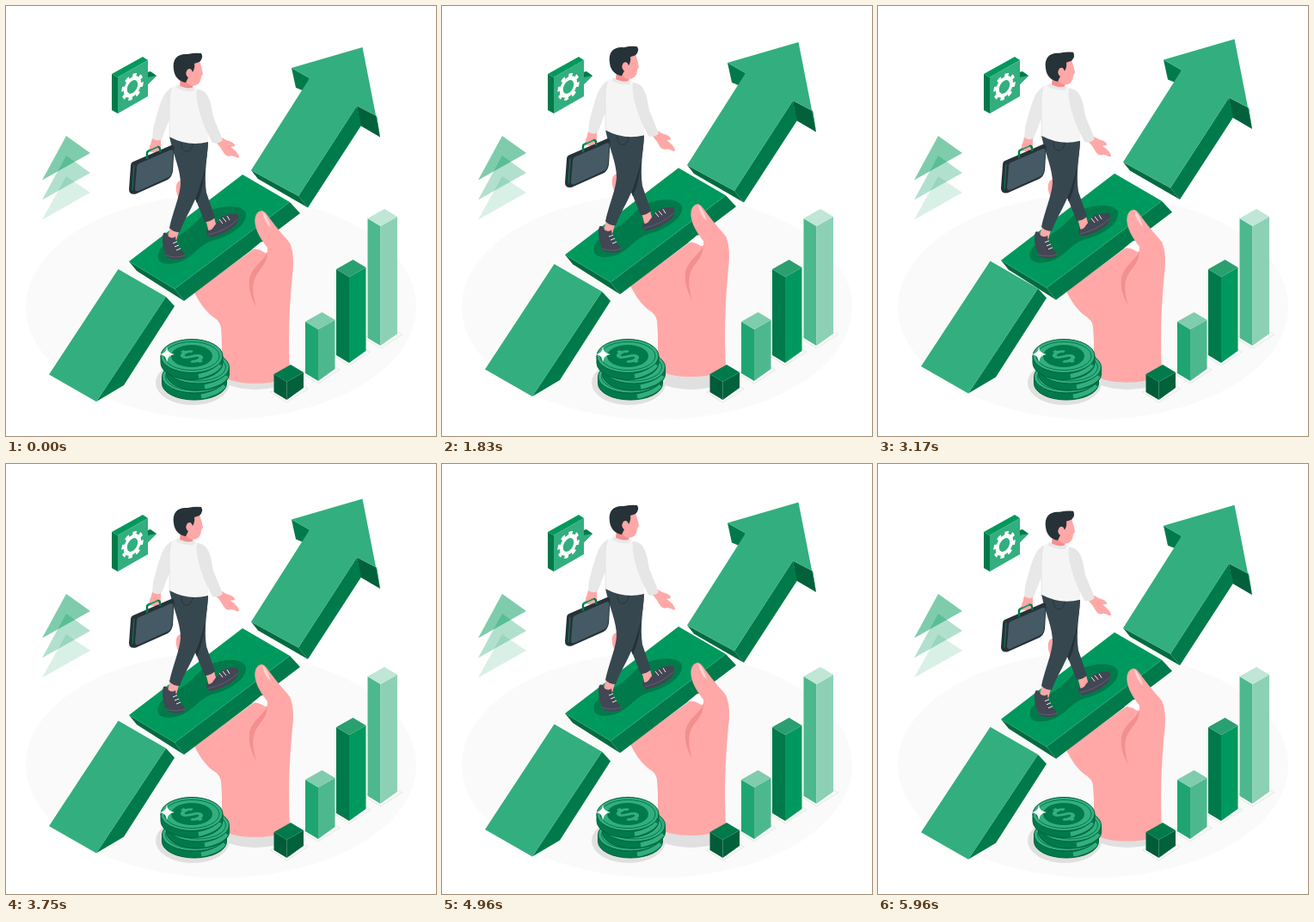
An HTML page that plays this animation: 500 px wide and 500 px high, repeating every 6 s.

```html
<!DOCTYPE html>
<html lang="en">
<head>
<meta charset="utf-8">
<title>Growth walk</title>
<style>
  html, body { margin: 0; width: 100%; height: 100%; overflow: hidden; background: #fff; }
  svg { display: block; width: 100vw; height: 100vh; }
</style>
</head>
<body>
<svg viewBox="0 0 500 500">
  <ellipse cx="250" cy="350" rx="227" ry="131" fill="#fafafa"/>
  <ellipse cx="290" cy="431" rx="41" ry="15" fill="#e0e0e0"/>
  <ellipse cx="217" cy="438" rx="43" ry="26" fill="#e0e0e0"/>

  <g id="triangles" fill="#00995d">
    <path d="M70 151 98 171 42 202.500Z" opacity=".5"/>
    <path d="M70 174 98 194 42 225.500Z" opacity=".3"/>
    <path d="M70 198 98 217 42 248.500Z" opacity=".15"/>
  </g>

  <g id="bubble">
    <path d="M164 77 168 76 175 81 164 92Z" fill="#007a4a"/>
    <path d="M164 83 175 81 164 92Z" fill="#33ae7f"/>
    <path d="M123 79 159 59 165 63 130 83Z" fill="#00995d"/>
    <path d="M123 79 130 83V125L123 121Z" fill="#007a4a"/>
    <path d="M130 83 165 63V105L130 125Z" fill="#33ae7f"/>
    <g id="gear" transform="matrix(.86 -.42 0 1 147 94)" fill="none" stroke="#fff">
      <circle r="9.500" stroke-width="4.500"/>
      <circle r="12.600" stroke-width="4.400" stroke-dasharray="5 4.896"/>
    </g>
  </g>

  <g id="arrow">
    <path d="M186 338 196 349 137 441 105 460Z" fill="#007a4a"/>
    <path d="M130.500 306 186 338 105 460 50 428.500Z" fill="#33ae7f"/>
    <path d="M332 72 353 84 347 99 337 95Z" fill="#007a4a"/>
    <path d="M408 116 431 128 435 152.500 412 139Z" fill="#00613b"/>
    <path d="M340 221 408 116 413 139 351 234.500Z" fill="#007a4a"/>
    <path d="M285 191 340 221 351 234.500 293 201Z" fill="#006b41"/>
    <path d="M414.500 48 435 152.500 431 128 408 116 340 221 285 191 353 84 332 72Z" fill="#33ae7f"/>
  </g>

  <g id="walker">
    <path d="M204 203C197 203 196 213 200 222L207 226V204Z" fill="#ffa8a7"/>
    <path d="M219 333C224 343 231 354 240 361Q249 366 250 374L251 390V427C254 443 327 443 330 426C328 390 329 355 333 312Q335 292 330 275L304 286 289 282Z" fill="#ffa8a7"/>
    <path d="M143 297 196 329 207 343 152 308Z" fill="#006b41"/>
    <path d="M196 329 330 228 342 241 207 343Z" fill="#007a4a"/>
    <path d="M143 297 275 196 330 228 196 329Z" fill="#00995d"/>
    <path d="M177 294C174 282 188 274 202 266C219 257 223 245 237 238C254 231 276 231 279 241C281 254 261 267 243 272C226 276 220 289 206 296C195 301 180 302 177 294Z" fill="#007a4a"/>

    <path d="M297 238C291 239 288 246 290 255C292 265 298 273 304 281Q305 288 299 294L316 322 333 312C335 295 334 281 328 273C318 262 309 250 303 242Q300 238 297 238Z" fill="#ffa8a7"/>
    <path d="M297 274Q304 280 304 285Q303 289 298 285 292 281 286 283Z" fill="#fff"/>
    <path d="M298 239Q304 243 308 258Q300 251 298 239Z" fill="#ffd3d2"/>
    <path d="M304 287C299 297 287 302 283 317Q281 333 291 350Q284 328 290 315C295 305 303 301 304 287Z" fill="#f28f8f"/>

    <path d="M232 248 242 246 245 257 236 263Z" fill="#ffa8a7"/>
    <path d="M233 260Q238 263 242 256 247 250 251 245 261 241 269 242 273 249 266 256 254 266 238 269 232 267 233 260Z" fill="#434653"/>
    <path d="M235 266Q255 262 270 248" fill="none" stroke="#62667a" stroke-width=".8"/>
    <path d="M248 248 252 253M252 246 256 251M257 244 260 249" stroke="#eee"/>
    <path d="M191 257 201 262 198 273 188 268Z" fill="#ffa8a7"/>
    <path d="M183 264Q187 262 189 268 194 271 197 268 198 281 206 286 209 290 207 293 197 297 187 292C184 284 180 273 183 264Z" fill="#434653"/>
    <path d="M186 290Q198 294 208 290" fill="none" stroke="#62667a" stroke-width=".8"/>
    <path d="M194 276 199 274M196 280 201 278M198 284 203 282" stroke="#eee"/>

    <path d="M212 165 235 158C234 178 230 195 233 217L243 246Q238 251 231 251L221 226Z" fill="#37474f"/>
    <path d="M231 184Q232 205 222 229L219 222Z" fill="#263238"/>
    <path d="M190 152Q210 161 235 158C234 180 230 195 226 208C220 230 209 244 202 263Q194 263 190 258C194 239 202 222 203 207C203 190 195 175 190 152Z" fill="#37474f"/>
    <path d="M204 159C203 172 216 173 217 160" fill="none" stroke="#263238" stroke-width=".9"/>

    <path d="M243 157 251 153Q255 156 262 158 267 161 266 163L261 164Q269 169 271 175 271 178 266 175L262 174Q257 176 254 172 249 163 243 157Z" fill="#ffa8a7"/>
    <path d="M193 95C182 99 178 117 171 143L170 155Q176 159 181 155L193 124Z" fill="#e8e8e8"/>
    <path d="M192 95C200 90 214 91 224 97C233 107 236 130 235 158Q212 164 190 152C191 132 188 112 192 95Z" fill="#f5f5f5"/>
    <path d="M192 95C188 112 191 132 190 152" fill="none" stroke="#e0e0e0" stroke-width=".8"/>
    <path d="M222 97C235 98 238 109 241 129L252 156Q247 161 240 159L232 143C226 128 220 110 222 97Z" fill="#e6e6e6"/>

    <path d="M203 83 219 88 216 98Q207 99 202 93Z" fill="#f28f8f"/>
    <path d="M199 91Q210 98 220 94L218 99Q207 100 198 95Z" fill="#e8e8e8"/>
    <path d="M210 71 225 64Q228 72 229 79L227 82Q227 92 217 93 208 91 208 81Z" fill="#ffa8a7"/>
    <path d="M195 74C193 61 200 55 211 56Q221 54 227 55 230 60 225 65L219 67Q220 72 217 77 215 71 211 74C208 78 210 82 212 83L209 89C202 88 196 83 195 74Z" fill="#263238"/>
    <path d="M215 74C210 72 207 80 213 83Z" fill="#ffa8a7"/>

    <path d="M170 154Q176 158 180 155L180 165 174 171 166 169Z" fill="#ffa8a7"/>
    <path d="M148 181 192 162Q196 161 195.500 167L194 192Q193 199 188 202L151 218.500Q143 220 143 213L145 186Q145 182 148 181Z" fill="#263238"/>
    <path d="M155 183 191 167.500Q195 166 194.500 171L193 191Q193 198 187 200L154 215Q150 216 150 212L152 188Q152 184 155 183Z" fill="#455a64"/>
    <path d="M149 185 147 214" stroke="#00995d" stroke-width=".8"/>
    <path d="M164 178V171Q164 169 167 168L176 164Q180 163 179 170" fill="none" stroke="#007a4a" stroke-width="2.400"/>
    <path d="M167 162 174 160 177 166 169 170Z" fill="#ffa8a7"/>
    <path d="M165 169 176 164" stroke="#00995d" stroke-width="1.600"/>
  </g>

  <g id="bars"></g>
  <g id="coins"></g>
  <path d="M187 396Q187.500 404 196 405 188 406 187 414 186.500 406 179 405 186.500 404 187 396Z" fill="#fff"/>
</svg>
<script>
const byId = id => document.getElementById(id);
const polygon = (points, fill, extra = '') => `<polygon points="${points}" fill="${fill}" ${extra}/>`;

// Isometric bar: x is the left edge, y the left corner of the top face.
function bar(x, y, height, left, right, top) {
  const base = y + height;
  return polygon([x - 4, base, x + 15, base + 12, x + 40, base - 4, x + 20, base - 15], '#fafafa', 'stroke="#dce5e0" stroke-width=".8"') +
    polygon([x, y, x + 15, y + 9, x + 15, base + 9, x, base], left) +
    polygon([x + 15, y + 9, x + 34.5, y - 2, x + 34.5, base - 5, x + 15, base + 9], right) +
    polygon([x, y, x + 19.5, y - 11, x + 34.5, y - 2, x + 15, y + 9], top);
}

function coin(x, y, rx, ry) {
  const side = 8;
  const ellipse = (dx, dy, style) => `<ellipse cx="${x}" cy="${y}" rx="${rx - dx}" ry="${ry - dy}" ${style}/>`;
  return `<path d="M${x - rx} ${y}v${side}a${rx} ${ry} 0 0 0 ${2 * rx} 0v${-side}z" fill="#007a4a" stroke="#00613b"/>
    <path d="M${x + 8} ${y + ry + 4}Q${x + rx - 9} ${y + ry} ${x + rx - 3} ${y + 10}" fill="none" stroke="#33ae7f" stroke-width="5"/>` +
    ellipse(0, 0, 'fill="#33ae7f" stroke="#00613b"') +
    ellipse(4, 3, 'fill="#33ae7f" stroke="#007a4a"');
}

byId('bars').innerHTML =
  bar(420.5, 247, 139, '#4db88d', '#8cd1b5', '#bfe6d6') +
  bar(384, 306, 100, '#007a4a', '#00995d', '#2a9f70') +
  bar(348, 367, 60, '#1fa571', '#4db88e', '#80ccae') +
  bar(311.5, 428, 21, '#005c38', '#00613b', '#007a4a');

byId('coins').innerHTML = coin(219, 431, 37.5, 19) + coin(223, 420, 36.5, 19) + coin(216, 407, 36, 19.5) +
  `<ellipse cx="216" cy="407" rx="24" ry="13" fill="#007a4a"/>
  <path d="M6-5C4-10-6-10-6-5S6 0 6 5S-4 10-6 5M0-13V-8M0 8V13" transform="matrix(.87 -.5 .87 .5 216 407.5)" fill="none" stroke="#33ae7f" stroke-width="4"/>`;

const RISE = 10;
// Linear up-and-down bob, 0 at the ends of each period.
const bob = (time, period) => -RISE * (1 - Math.abs(2 * (time % period) / period - 1));
const arrow = byId('arrow'), walker = byId('walker');
const start = performance.now();

function draw(now) {
  const time = Math.max(0, now - start) % 6000;
  arrow.setAttribute('transform', `translate(0 ${bob(time, 6000)})`);
  walker.setAttribute('transform', `translate(0 ${bob(time, 3000)})`);
  requestAnimationFrame(draw);
}
draw(start);
</script>
</body>
</html>
```
